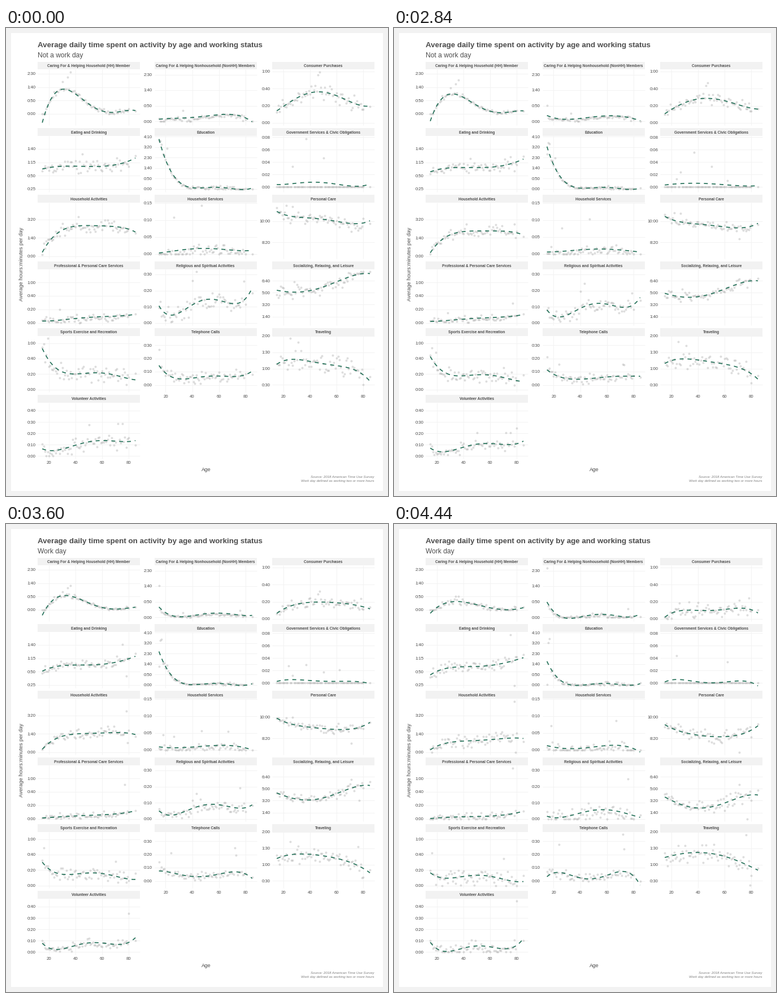
These frames come from a looping animation (676x828 px, 6.72 s). A matplotlib script:

```python
import numpy as np
import matplotlib.pyplot as plt
from matplotlib.animation import FuncAnimation
from matplotlib.collections import LineCollection
from matplotlib.patches import Rectangle

W, H, DPI = 676, 828, 96
FRAMES, STEP_MS = 168, 40
HOLD, MOVE = 55, 56          # frames before the move, frames it takes

INK, PALE, GREEN = "#4d4d4d", "#f2f2f2", "#26725a"
LEFT = (56, 262.5, 471)      # panel left edges
PANEL_W, ROW_H = 181.2, 117.85
YEAR = 2.355                 # pixels per year of age

AGES = np.append(np.arange(15, 81), 85)
KNOTS = np.linspace(15, 85, 5)
FINE = np.linspace(15, 85, 81)

plt.rcParams["font.family"] = "Liberation Sans"
rng = np.random.default_rng(11)

fig = plt.figure(figsize=(W / DPI, H / DPI), dpi=DPI, facecolor=PALE)
ax = fig.add_axes([0, 0, 1, 1])
ax.axis("off")
ax.add_patch(Rectangle((9, 9), 658, 810, fc="white", ec="none"))

grid, curves, dots = [], [], []


def label(x, y, text, size, ha="center", va="center_baseline", color=INK, **kw):
    return ax.text(x, y, text, fontsize=size, ha=ha, va=va, color=color, **kw)


def clock(minutes):
    return f"{minutes // 60}:{minutes % 60:02d}"


def age_x(col, age):
    return LEFT[col] + 8.2 + (np.asarray(age) - 15) * YEAR


def quartic(knot_ys, age):
    fit = np.polyfit((KNOTS - 50) / 35, knot_ys, 4)
    return np.polyval(fit, (age - 50) / 35)


def draw_frame(col, row, title, start, step, y0, dy, count):
    left, top = LEFT[col], 59.6 + ROW_H * row
    ax.add_patch(Rectangle((left, top), PANEL_W, 13.8, fc=PALE, ec="none"))
    label(left + PANEL_W / 2, top + 7, title, 5, weight="bold")
    for i in range(count):
        y = y0 - i * dy
        grid.append([(left, y), (left + PANEL_W, y)])
        label(left - 3.7, y, clock(start + i * step), 5.8, "right")
    for age in (20, 40, 60, 80):
        x = age_x(col, age)
        grid.append([(x, top + 13.8), (x, top + 112.8)])
        if row == 5 or (row == 4 and col > 0):
            label(x, top + 120, str(age), 5.8)
    return top


def panel(col, row, title, axis, off, work, spread, lag=0, spots=()):
    """axis: first minute, minute step, first y, y step, count.
    off, work: curve heights at KNOTS; lag: how far dots sit below it.
    spots: stand-out dots as (age, y off, y at work)."""
    top = draw_frame(col, row, title, *axis)
    floor = axis[2] if axis[0] == 0 else top + 112
    x = age_x(col, AGES)
    days = []
    for knots in (off, work):
        noise = spread * np.clip(rng.standard_normal(AGES.size), -2, 2)
        y = quartic(knots, AGES) + lag + noise
        days.append(np.clip(y, top + 18, floor))
    for age, *ys in spots:
        for day, y in zip(days, ys):
            day[AGES == age] = y
    dots.append([np.column_stack([x, y]) for y in days])
    curves.append([np.column_stack([age_x(col, FINE), quartic(k, FINE)])
                   for k in (off, work)])


panel(0, 0, "Caring For & Helping Household (HH) Member", (0, 50, 152, 23.75, 4),
      (167.5, 108.5, 134.5, 149.3, 146), (158, 137.3, 142.8, 151, 148), 2.5,
      spots=[(30, 95, 135), (34, 87, 128), (36, 78, 128)])
panel(1, 0, "Caring For & Helping Nonhousehold (NonHH) Members",
      (0, 50, 165, 27.5, 4),
      (161.5, 159.3, 156, 152.8, 166), (138, 167, 160.5, 162.5, 159), 2.5, 2,
      spots=[(15, 160, 78), (33, 146, 163), (76, 158, 150)])
panel(2, 0, "Consumer Purchases", (0, 20, 168, 30.5, 4),
      (146.5, 121, 113.5, 127.5, 138), (165, 152.5, 153, 149.3, 157.5), 7,
      spots=[(46, 83, 148), (47, 78, 143), (78, 134, 131)])
panel(0, 1, "Eating and Drinking", (25, 25, 284.5, 23.5, 4),
      (249.5, 244.5, 245, 243, 230), (267, 253.5, 252, 247.5, 236.5), 6,
      spots=[(45, 223, 251), (75, 241, 196), (78, 240, 286)])
panel(1, 1, "Education", (0, 50, 284.5, 18.45, 6),
      (196.5, 276.5, 282.5, 283.5, 283), (243, 284.5, 283, 283.5, 282.5), 2, 0.5,
      spots=[(15, 199, 284), (16, 200, 210), (17, 206, 203), (21, 213, 272)])
panel(2, 1, "Government Services & Civic Obligations", (0, 2, 281, 22, 5),
      (277, 274, 273.5, 278.8, 276), (279.5, 276.8, 281, 278, 286.5), 1.5, 9,
      spots=[(24, 281, 233), (27, 245, 281), (37, 196, 281), (50, 230, 281),
             (62, 281, 244)])
panel(0, 2, "Household Activities", (0, 100, 404, 32.75, 3),
      (397, 355, 349.5, 351, 361), (399.5, 385.5, 383, 380, 379.5), 6,
      spots=[(42, 334, 380), (78, 360, 314), (79, 358, 404)])
panel(1, 2, "Household Services", (0, 5, 400, 30, 4),
      (398, 392.5, 390, 392.5, 393.5), (392, 397.5, 394.5, 391.5, 403.5), 6, 4,
      spots=[(18, 399, 357), (26, 335, 400), (47, 314, 397), (67, 399, 348)])
panel(2, 2, "Personal Care", (500, 100, 379.3, 37.3, 2),
      (324.5, 335, 338.5, 345, 341), (355, 370.5, 376, 374.5, 357), 6,
      spots=[(22, 314, 360), (27, 316, 358), (71, 360, 404)])
panel(0, 3, "Professional & Personal Care Services", (0, 20, 521.5, 23.8, 4),
      (518.5, 515.8, 512, 510, 506.5), (521, 518.5, 517.5, 515.5, 508), 4, 1,
      spots=[(28, 498, 518), (77, 509, 432)])
panel(1, 3, "Religious and Spiritual Activities", (0, 10, 521.5, 28.5, 4),
      (491.5, 501, 480.5, 486.5, 460), (517, 516, 506.5, 508, 519), 8, 2,
      spots=[(40, 447, 514), (43, 431, 505), (76, 494, 451), (79, 448, 521)])
panel(2, 3, "Socializing, Relaxing, and Leisure", (100, 100, 510.6, 21.2, 4),
      (464, 467, 458, 442, 434.5), (483, 500, 500.5, 487, 479.5), 7,
      spots=[(28, 449, 495), (71, 437, 461), (77, 434, 522)])
panel(0, 4, "Sports Exercise and Recreation", (0, 20, 639.5, 27.3, 4),
      (567, 610.3, 610.5, 613, 622.5), (617, 626, 621.5, 627, 632.5), 8, 1,
      spots=[(16, 559, 582), (19, 549, 638), (70, 605, 592)])
panel(1, 4, "Telephone Calls", (0, 10, 631.5, 23.5, 4),
      (597, 621, 616.5, 616.5, 607), (624, 621, 627.5, 616, 639), 5, 1,
      spots=[(15, 569, 615), (24, 606, 567), (72, 613, 549), (73, 604, 575)])
panel(2, 4, "Traveling", (30, 30, 631.3, 28.8, 4),
      (595, 587, 594, 600.5, 625), (590, 582, 583, 594, 612.5), 8.5,
      spots=[(25, 549, 569), (31, 556, 578), (76, 606, 550), (79, 604, 639)])
panel(0, 5, "Volunteer Activities", (0, 10, 757.3, 20.1, 5),
      (744.5, 743.5, 732.2, 730.5, 730), (740, 754.8, 746.5, 751, 733), 7, 2,
      spots=[(50, 702, 751), (72, 700, 757), (75, 700, 757), (80, 725, 667)])

label(56, 29.5, "Average daily time spent on activity by age and working status",
      10, "left", weight="bold")
subtitle = label(56, 47.5, "", 9, "left")
label(354, 781, "Age", 7)
label(28, 418, "Average hours:minutes per day", 7, va="center", rotation=90)
for y, text in ((793.8, "Source: 2018 American Time Use Survey"),
                (800.5, "Work day defined as working two or more hours")):
    label(652, y, text, 4.55, "right", color="#7f7f7f", style="italic")

dots_off, dots_work = (np.vstack(day) for day in zip(*dots))
lines_off, lines_work = (np.array(day) for day in zip(*curves))

grey = (0.5, 0.5, 0.5, 0.2)
cloud = ax.scatter(*dots_off.T, s=5.6, facecolors=[grey], edgecolors=[grey],
                   linewidths=0.7, zorder=2)
smooth = LineCollection(lines_off, colors=GREEN, linewidths=1.3,
                        linestyles=[(0, (4, 4))], zorder=3)
ax.add_collection(smooth)
ax.add_collection(LineCollection(grid, colors=PALE, linewidths=0.75, zorder=1))
ax.set_xlim(0, W)
ax.set_ylim(H, 0)


def update(k):
    p = min(max((k - HOLD) / MOVE, 0), 1)
    cloud.set_offsets(dots_off + (dots_work - dots_off) * p)
    smooth.set_segments(lines_off + (lines_work - lines_off) * p)
    subtitle.set_text("Not a work day" if p <= 0.5 else "Work day")
    return cloud, smooth, subtitle


anim = FuncAnimation(fig, update, frames=FRAMES, interval=STEP_MS,
                     init_func=lambda: update(0), repeat=True)
plt.show()
```
